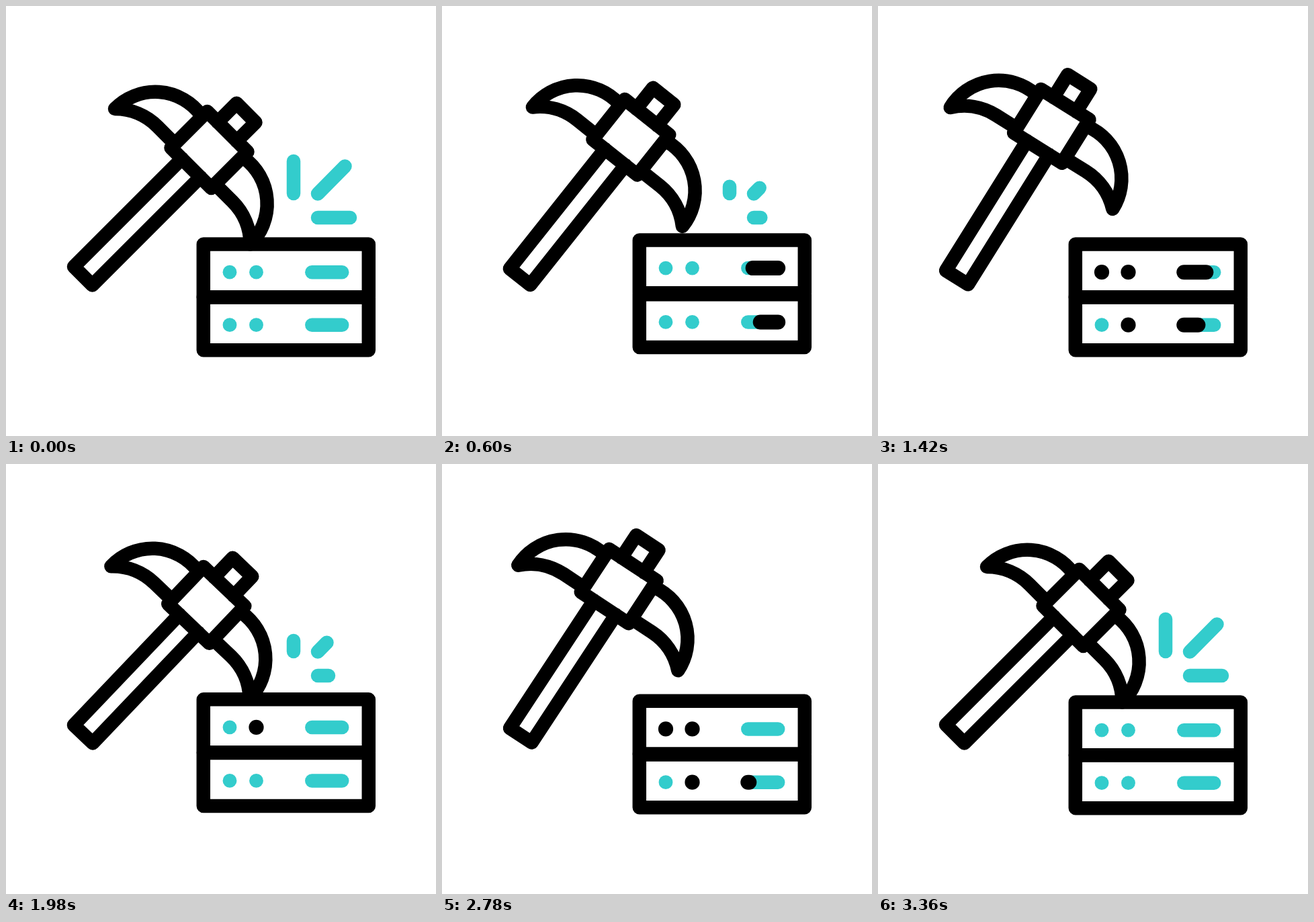
These frames come from a looping animation (640x640 px, 3.6 s). An HTML page with a canvas:

```html
<!DOCTYPE html>
<html>
<head>
<meta charset="utf-8">
<style>
html, body { margin: 0; width: 100%; height: 100%; overflow: hidden; background: #fff; }
canvas { display: block; width: 640px; height: 640px; }
</style>
</head>
<body>
<canvas id="stage" width="640" height="640"></canvas>
<script>
const ctx = document.getElementById('stage').getContext('2d');
const LOOP = 3600, TEAL = '#33cccc', BLACK = '#000', LINE = 20.5;

// All times in ms.
const RAISES = [160, 940, 2200], RAISE_TIME = 240;
const STRIKES = [400, 1660, 2700], STRIKE_TIME = 400;
const BURSTS = [
  { grow: 395, full: 1080, leave: 740 },
  { grow: 1740, full: 2360, leave: 2060 },
  { grow: 2780, full: 3360, leave: LOOP + 160 }
];
const SWEEPS = [
  { at: 168, span: 300 },
  { at: 964, span: 300, back: true },
  { at: 2060, span: 300 },
  { at: 2745, span: 275 }
];
const BLINKS = [180, 915, 1110, 1580, 2480, 2900], BLINK_TIME = 290;

// Smooth 0 to 1 between two times.
function ramp(t, from, to) {
  const p = Math.min(1, Math.max(0, (t - from) / (to - from)));
  return p * p * (3 - 2 * p);
}
const pulse = (t, from, peak, to) => ramp(t, from, peak) - ramp(t, peak, to);
const total = (starts, t, span) => starts.reduce((sum, s) => sum + ramp(t, s, s + span), 0);

function rotateAbout(x, y, degrees) {
  ctx.translate(x, y);
  ctx.rotate(degrees * Math.PI / 180);
  ctx.translate(-x, -y);
}

function trimmed(x1, y1, x2, y2, from, to, color, width = LINE) {
  if (to - from < 0.002) return;
  const dx = x2 - x1, dy = y2 - y1;
  ctx.strokeStyle = color;
  ctx.lineWidth = width;
  ctx.beginPath();
  ctx.moveTo(x1 + dx * from, y1 + dy * from);
  ctx.lineTo(x1 + dx * to, y1 + dy * to);
  ctx.stroke();
}

function dot(x, y, r, color) {
  ctx.fillStyle = color;
  ctx.beginPath();
  ctx.arc(x, y, r, 0, 7);
  ctx.fill();
}

const blade = new Path2D('M290 162A84.5 84.5 0 0 0 162 153A90 90 0 0 1 225.6 179.4L247 201');
const body = new Path2D(
  'M299.5 157L359.5 217L305.5 271L245.5 211Z' +
  'M315 173L343.2 144.8L371.5 173.2L343.3 201.3' +
  'M262 227L101 388L128.5 415.5L289.5 254.5');

function pickaxe(t) {
  const raised = total(RAISES, t, RAISE_TIME) - total(STRIKES, t, STRIKE_TIME);
  ctx.save();
  rotateAbout(126.2, 390.6, -13 * raised);
  ctx.strokeStyle = BLACK;
  ctx.lineWidth = LINE;
  ctx.stroke(body);
  ctx.stroke(blade);
  // Mirror the blade across the handle's axis.
  ctx.transform(0, -1, -1, 0, 516.5, 516.5);
  ctx.stroke(blade);
  ctx.restore();
}

function rays(t) {
  for (const { grow, full, leave } of BURSTS) {
    // A burst may still be leaving when the loop starts over.
    const u = leave > LOOP && t < grow ? t + LOOP : t;
    const from = ramp(u, leave, leave + 400), to = ramp(u, grow, full);
    trimmed(428, 279, 428, 231, from, to, TEAL);
    trimmed(464, 279.5, 504.5, 238.5, from, to, TEAL);
    trimmed(464, 315, 512, 315, from, to, TEAL);
  }
}

function sweep(t) {
  const { at, span, back } = SWEEPS.findLast(s => s.at <= t) ?? SWEEPS[0];
  const fill = ramp(t, at, at + span), drain = ramp(t, at + span, at + 2 * span);
  return back ? [0, fill - drain] : [drain, fill];
}

function server(t, row) {
  const top = 354.6 + row * 78.8, lightY = 396.2 + row * 78.5;
  const strike = STRIKES.findLast(s => s <= t) ?? LOOP;
  const u = Math.min(t, 3340) - strike - row * 10;
  const lift = (6.4 - 1.8 * row) * pulse(u, 0, 230, 460);
  const tilt = 2.6 * pulse(u, 400, 490, 640) - 2.4 * pulse(u, 640, 740, 840);

  ctx.save();
  ctx.translate(0, -lift);
  rotateAbout(416.7, top + 39.4, tilt);
  ctx.strokeStyle = BLACK;
  ctx.lineWidth = LINE;
  ctx.strokeRect(293.8, top, 246, 78.8);

  for (const col of [0, 1]) {
    const age = t - ((1 - row) * 2 + col) * 40;
    const lit = BLINKS.some(on => age >= on && age < on + BLINK_TIME);
    dot(333 + col * 39.5, lightY, lit ? 11.1 : 10.4, lit ? BLACK : TEAL);
  }
  const dash = [455.3, lightY, 500.2, lightY];
  trimmed(...dash, 0, 1, TEAL);
  trimmed(...dash, ...sweep(t - (1 - row) * 55), BLACK, 22);
  ctx.restore();
}

function draw(t) {
  ctx.fillStyle = '#fff';
  ctx.fillRect(0, 0, 640, 640);
  ctx.lineCap = ctx.lineJoin = 'round';
  pickaxe(t);
  rays(t);
  server(t, 0);
  server(t, 1);
}

let first;
function tick(now) {
  first ??= now;
  draw((now - first) % LOOP);
  requestAnimationFrame(tick);
}
draw(0);
requestAnimationFrame(tick);
</script>
</body>
</html>
```
